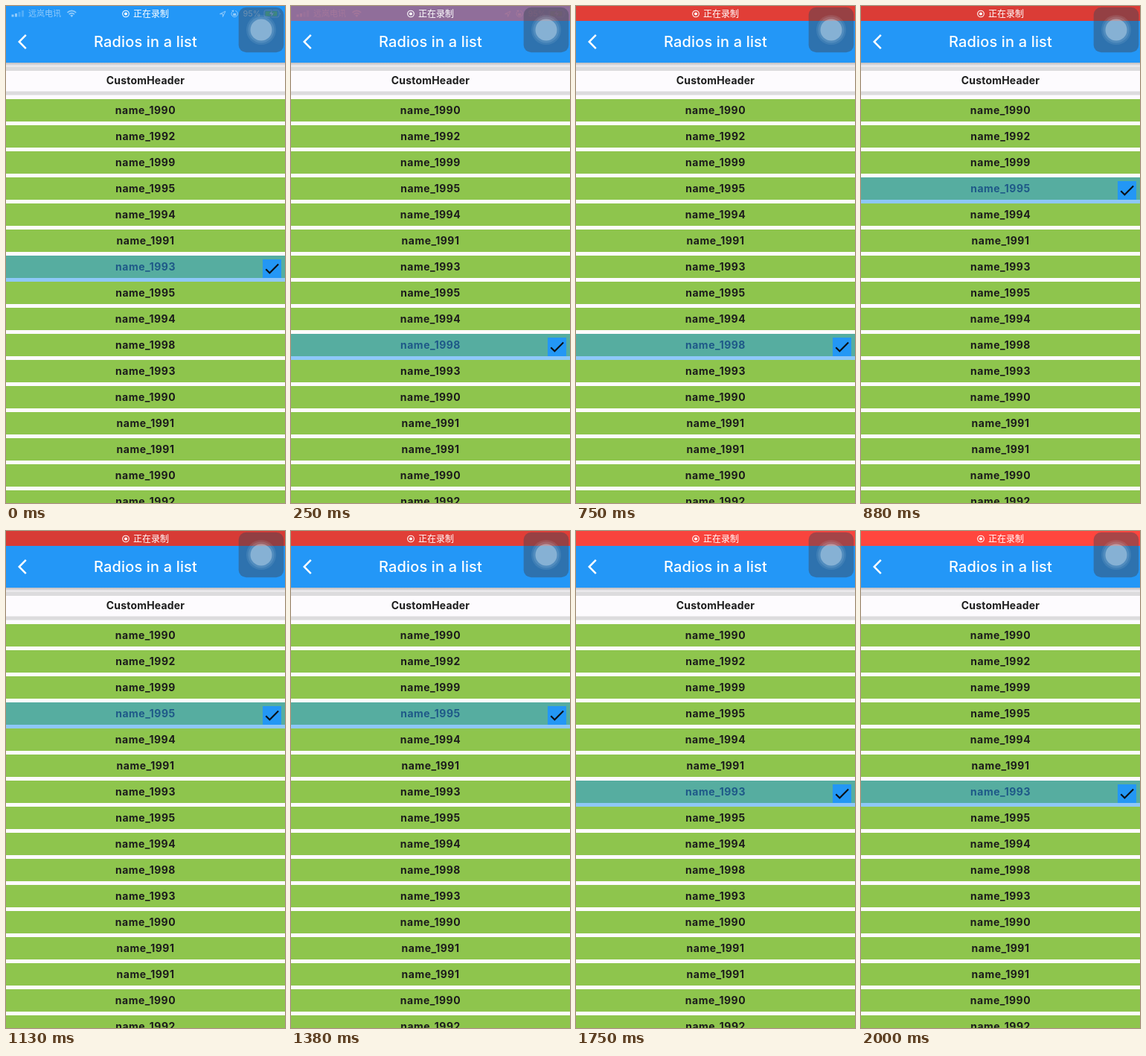
Recreate the animation shown at these times as an HTML page. Size 375x667 px, loop 2120 ms.

```html
<!DOCTYPE html>
<html lang="en">
<head>
<meta charset="utf-8">
<title>Radios in a list</title>
<style>
  html, body { margin: 0; width: 100%; height: 100%; overflow: hidden; background: #fdfbfe; }
  svg { display: block; width: 375px; height: 667px; }
  text { font-family: Inter, "Noto Sans CJK SC", "Noto Sans CJK", sans-serif; }
  .label { font-size: 14px; font-weight: 700; letter-spacing: .18px; text-anchor: middle; fill: #1c1c1c; }
  #rows .label { letter-spacing: .5px; }
  .title { font-size: 20px; font-weight: 500; letter-spacing: .15px; text-anchor: middle; fill: #fff; }
  .cjk { font-family: "Noto Sans CJK SC", "Noto Sans CJK", sans-serif; }
  .line { fill: none; stroke: #fff; }
</style>
</head>
<body>
<svg viewBox="0 0 375 667">
  <defs>
    <linearGradient id="shade" x2="0" y2="1">
      <stop offset="0" stop-color="#000" stop-opacity=".25"/>
      <stop offset="1" stop-color="#000" stop-opacity="0"/>
    </linearGradient>
  </defs>

  <rect width="375" height="667" fill="#fdfbfe"/>
  <path d="M0 81.5H375V87H0zM0 114.5H375V119.5H0z" fill="#dcdbdd"/>
  <text class="label" x="187.5" y="105">CustomHeader</text>
  <g id="rows"></g>

  <g id="selection">
    <rect width="375" height="35" fill="#2196f3" opacity=".5"/>
    <rect x="345" y="5" width="25" height="25" fill="#2397f5"/>
    <path transform="translate(345 5) scale(1.04)" d="M9 16.17L4.83 12l-1.42 1.41L9 19 21 7l-1.41-1.41z" fill="#0a0f14"/>
  </g>

  <rect y="76" width="375" height="6" fill="url(#shade)"/>
  <rect width="375" height="76" fill="#2397f7"/>
  <path transform="translate(16 36)" d="M11.67 3.87L9.9 2.1 0 12l9.9 9.9 1.77-1.77L3.54 12z" fill="#fff"/>
  <text class="title" x="187.5" y="55">Radios in a list</text>

  <g id="status" fill="#fff">
    <path d="M7.5 11.5h3v3h-3zM12 10h3v4.5h-3z"/>
    <path d="M16.5 8h3v6.5h-3zM21 6h3v8.5h-3z" opacity=".4"/>
    <text class="cjk" x="30" y="14.3" font-size="11">远岚电讯</text>
    <path class="line" stroke-width="1.7" d="M82.5 8.8a8.2 8.2 0 0 1 11.6 0M84.7 11.2a5.1 5.1 0 0 1 7.2 0"/>
    <path d="M88.3 15l-2-2.2a2.9 2.9 0 0 1 4 0z"/>
    <path class="line" d="M287.5 10.7l7.5-3.7-3.6 7.5v-3.8z"/>
    <path class="line" d="M303.8 8a4.2 4.2 0 1 0 4.5-1.6"/>
    <path d="M305.2 9.7h4v3.3h-4zM303 6l3.5-.5-1 3z"/>
    <text x="318.5" y="14" font-size="11">95%</text>
    <rect class="line" x="347" y="5.5" width="20" height="9.5" rx="2.5" opacity=".6"/>
    <rect x="348.5" y="7" width="16" height="6.5" rx="1" fill="#5ee04f"/>
    <path d="M368.3 8.7q1.6 1.5 0 3z"/>
    <path d="M358.5 4.5l-5 6.5h3.2l-1.2 5 5-6.7h-3.2z" stroke="#2b7fc4" stroke-width=".6"/>
  </g>

  <rect id="alert" width="375" height="20"/>
  <circle class="line" cx="161" cy="10.5" r="4.3" stroke-width="1.1"/>
  <circle cx="161" cy="10.5" r="2" fill="#fff"/>
  <text class="cjk" x="171" y="14.8" font-size="12" fill="#fff">正在录制</text>

  <rect x="312.7" y="1.7" width="60.6" height="60.6" rx="10" fill="#3c4655" opacity=".45"/>
  <g fill="#cfe4f2" transform="translate(343 32)">
    <circle r="20" opacity=".1"/>
    <circle r="17.5" opacity=".13"/>
    <circle r="14.5" opacity=".42"/>
  </g>
</svg>
<script>
const LOOP = 2120;
const STEP = 125;
const LAST_DIGITS = "0295413548301102";
const PICKED_ROWS = [6, 9, 3];

const byId = id => document.getElementById(id);
const rowTop = row => 125 + 35 * row;

byId("rows").innerHTML = [...LAST_DIGITS].map((digit, row) =>
  `<rect y="${rowTop(row)}" width="375" height="30" fill="#8ec54d"/>
   <text class="label" x="187.5" y="${rowTop(row) + 20}">name_199${digit}</text>`).join("");

const selection = byId("selection");
const status = byId("status");
const alertBar = byId("alert");

function render(time) {
  // The picture holds for 125 ms, with changes falling on whole hundredths of a second.
  const step = Math.floor(Math.floor(time / 10) * 10 / STEP);

  // A new row is picked every five steps.
  const picked = PICKED_ROWS[Math.floor((step + 3) / 5) % PICKED_ROWS.length];
  selection.setAttribute("transform", `translate(0 ${rowTop(picked)})`);

  // The recording bar fades in over the status icons, then pulses.
  status.setAttribute("opacity", Math.max(0, 0.5 * (1 - step / 3)));
  const red = 235 + 20 * Math.cos(2 * Math.PI * (step - 1) / 15);
  alertBar.setAttribute("fill", `rgb(${[1, 0.275, 0.245].map(share => Math.round(red * share))})`);
  alertBar.setAttribute("opacity", Math.min(1, step / 4));
}

const start = performance.now();
function tick() {
  render((performance.now() - start) % LOOP);
  requestAnimationFrame(tick);
}
tick();
</script>
</body>
</html>
```
